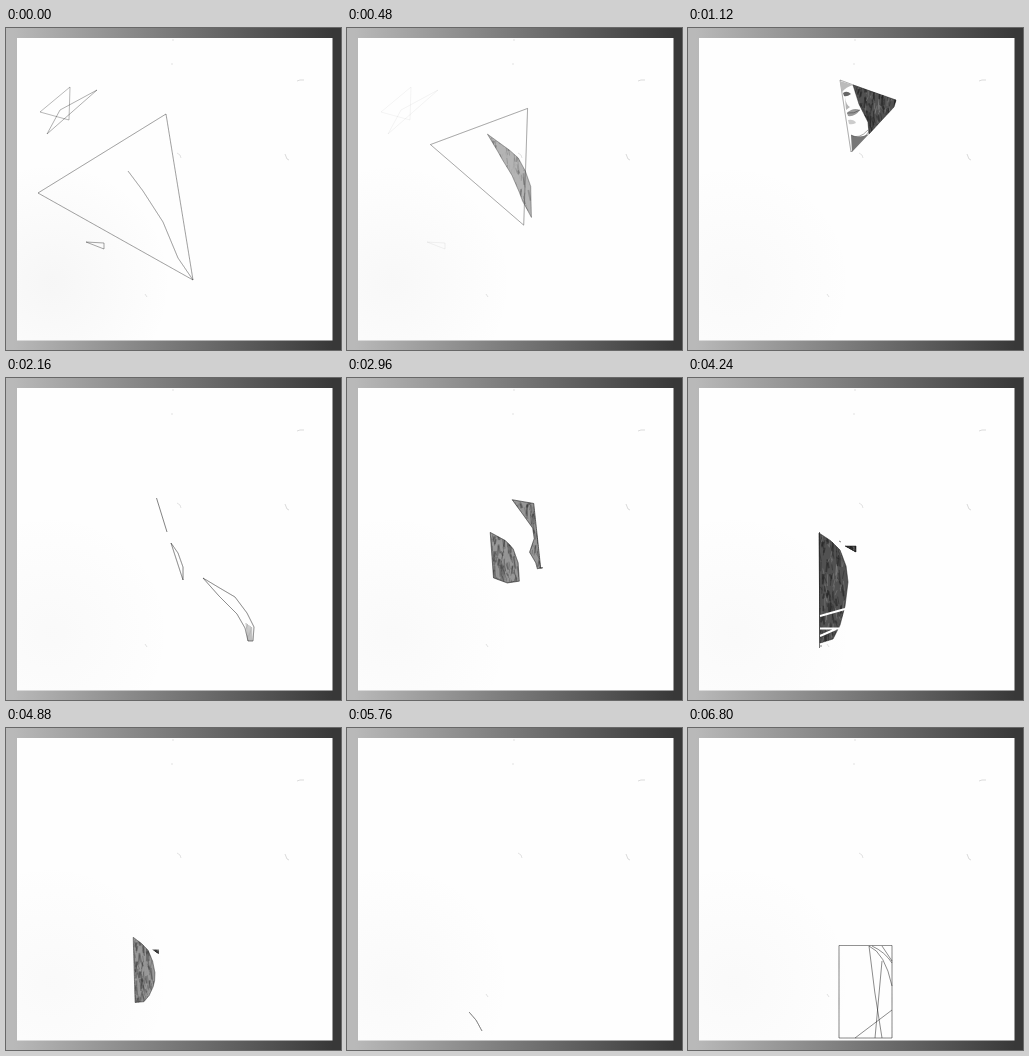
An HTML page with a canvas that plays this animation: 335 by 322 pixels, repeating every 6.88 s.

```html
<!DOCTYPE html>
<html lang="en">
<head>
<meta charset="utf-8">
<title>Pencil sections</title>
<style>
html, body { margin: 0; width: 100%; height: 100%; overflow: hidden; background: #fff; }
canvas { display: block; width: 335px; height: 322px; }
</style>
</head>
<body>
<canvas id="stage" width="335" height="322"></canvas>
<script>
const ctx = document.getElementById('stage').getContext('2d');
const STEP = 80, LOOP = 6880, POINTS = 360;
const lerp = (a, b, k) => a + (b - a) * k;

function random(seed) {
  return () => {
    seed = (seed * 1664525 + 1013904223) >>> 0;
    return seed / 4294967296;
  };
}

// Spread a closed outline over a fixed number of points, keeping its corners.
function outline(text) {
  const v = text.split(' ').map(p => p.split(',').map(Number));
  return Array.from({ length: POINTS }, (_, i) => {
    const u = i * v.length / POINTS, n = Math.floor(u + 1e-9);
    const a = v[n], b = v[(n + 1) % v.length], k = u - n;
    return [lerp(a[0], b[0], k), lerp(a[1], b[1], k)];
  });
}
const pose = (at, line, tone, text) => ({ at, line, tone, pts: outline(text) });

const main = [
  pose(0, .55, 0, '32,165 160,86 187,252'),
  pose(14, .5, 0, '152,52 208,73 163,124'),
  pose(27, .75, 0, '165,165 172,175 177,189 177,202'),
  pose(44, .9, 1, '128,147 150,156 161,165 167,182 169,207 128,207'),
  pose(53, .8, 1, '131,155 143,163 152,172 158,188 160,204 157,228 152,247 145,261 132,265'),
  pose(72, .45, 0, '122,284 129,292 135,303 129,292'),
  pose(85, .72, 0, '151,217.5 204,217.5 204,310 151,310')
];
const second = [
  pose(0, .3, 0, '122,143 137,163 157,194 172,230 187,252 172,230 157,194 137,163'),
  pose(14, .7, 1, '165,57 208,72 206,79 181,106 180,94 171,76'),
  pose(27, .75, 0, '197,200 212,209 229,219 241,235 248,249 247,263 242,263 239,250 231,236 213,218'),
  pose(44, .9, 1, '143,67 169,67 169,170 164,158 150,150 148,130 141,112 151,98 154,90 149,78'),
  pose(53, .7, 1, '157,168 168,168 168,174'),
  pose(66, 0, 0, '140,255 143,255 143,258'),
  pose(85, 0, 0, '140,255 143,255 143,258')
];

function stroke(d, alpha = .6, width = .8, color = '#222') {
  ctx.save();
  ctx.globalAlpha *= alpha;
  ctx.strokeStyle = color;
  ctx.lineWidth = width;
  ctx.stroke(new Path2D(d));
  ctx.restore();
}
function fill(d, color) {
  ctx.fillStyle = color;
  ctx.fill(new Path2D(d));
}

const rnd = random(41);
const hatch = Array.from({ length: 190 }, () => ({
  x: rnd(), y: rnd(), len: 3 + rnd() * 9, lean: rnd() * 5 - 2.5, dark: rnd()
}));

function shade(path, pts, tone) {
  const xs = pts.map(p => p[0]), ys = pts.map(p => p[1]);
  const x0 = Math.min(...xs), y0 = Math.min(...ys);
  const w = Math.max(...xs) - x0, h = Math.max(...ys) - y0;
  ctx.save();
  ctx.globalAlpha = tone;
  ctx.fillStyle = '#515151';
  ctx.fill(path);
  ctx.clip(path);
  for (const s of hatch) {
    const x = x0 + s.x * w, y = y0 + s.y * h;
    const color = s.dark < .62 ? '#222' : '#8c8c8c';
    stroke(`M${x},${y}l${s.lean},${s.len}`, .55, s.dark < .2 ? 1.8 : .8, color);
  }
  ctx.restore();
}

function morph(track, frame) {
  let n = 0;
  while (n < track.length - 2 && frame >= track[n + 1].at) n++;
  const a = track[n], b = track[n + 1];
  const k = (frame - a.at) / (b.at - a.at);
  const pts = a.pts.map((p, i) => [lerp(p[0], b.pts[i][0], k), lerp(p[1], b.pts[i][1], k)]);
  const tone = lerp(a.tone, b.tone, k);
  const path = new Path2D();
  pts.forEach(p => path.lineTo(p[0], p[1]));
  path.closePath();
  if (tone > 0) shade(path, pts, tone);
  ctx.save();
  ctx.globalAlpha = lerp(a.line, b.line, k);
  ctx.strokeStyle = '#222';
  ctx.lineWidth = .8;
  ctx.lineJoin = 'round';
  ctx.stroke(path);
  ctx.restore();
}

// Small marks appear and leave around one moment.
function near(frame, at, span, draw) {
  const alpha = 1 - Math.abs(frame - at) / span;
  if (alpha <= 0) return;
  ctx.save();
  ctx.globalAlpha = alpha;
  draw();
  ctx.restore();
}

function slivers() {
  stroke('M34,84L64,59L63,92Z', .4);
  stroke('M41,106L54,82L91,62Z', .45);
  stroke('M80,214L98,215L98,221Z', .5);
}
function portrait() {
  fill('M163,107Q170,111 181,106L164,124Z', '#777');
  fill('M152,53L165,57Q158,59 154,64Z', '#bbb');
  fill('M155,65Q159,62 163,66Q159,69 156,68Z', '#666');
  fill('M157,69Q158,77 162,79L158,82Z', '#b5b5b5');
  fill('M159,85Q165,79 172,82Q167,89 160,88Z', '#999');
  fill('M160,92Q166,91 168,95Q164,97 161,96Z', '#ccc');
  stroke('M159,85Q166,86 172,82', .5);
  stroke('M163,107Q171,112 180,102', .5);
}
function hornTip() {
  stroke('M150.5,120L161,154', .7);
  for (let i = 0; i < 5; i++) stroke(`M${240 + i * 1.4},${245 + i}L${242 + i},263`, .4);
}
function cuts() {
  stroke('M132,238L157,231M132,250.5L151,250.5M132,258L148,251', 1, 2, '#fff');
  stroke('M131.5,154V270', .8, .8);
  stroke('M132,268h2M151,163l2,1', .7);
}
function chords() {
  stroke('M181,218Q186,264 194,310M194,233L187,310M167,310L204,282', .65);
  stroke('M181,218Q197,225 204,258M184,218Q197,224 204,235M194,218L204,233', .65);
}

function paper(frame) {
  const edge = ctx.createLinearGradient(8, 0, 327, 0);
  edge.addColorStop(0, '#b9b9b9');
  edge.addColorStop(1, '#383838');
  ctx.fillStyle = edge;
  ctx.fillRect(0, 0, 335, 322);
  ctx.fillStyle = '#fefefe';
  ctx.fillRect(11, 10, 315.5, 302.5);
  const haze = ctx.createRadialGradient(45, 255, 5, 45, 255, 120);
  haze.addColorStop(0, `rgba(120,120,120,${.03 + .025 * Math.max(0, 1 - frame / 12)})`);
  haze.addColorStop(1, 'rgba(120,120,120,0)');
  ctx.fillStyle = haze;
  ctx.fillRect(11, 130, 315, 182);
  stroke('M165,36h2M166,12h2M139,266l2,3M171,125l3,2l1,3', .16);
  stroke('M291,53l3,-1h4M279,126l2,5l2,1', .2);
}

function draw(frame) {
  paper(frame);
  morph(main, frame);
  near(frame, 14, 6, portrait);
  morph(second, frame);
  near(frame, 0, 7, slivers);
  near(frame, 27, 6, hornTip);
  near(frame, 44, 5, () => stroke('M157,56h2M157,163l3,1', .8, 1.3));
  near(frame, 53, 5, cuts);
  near(frame, 85, 9, chords);
}

const start = performance.now();
let shown = -1;
function tick(now) {
  const frame = Math.floor(Math.max(0, now - start) % LOOP / STEP);
  if (frame !== shown) draw(shown = frame);
  requestAnimationFrame(tick);
}
tick(start);
</script>
</body>
</html>
```
